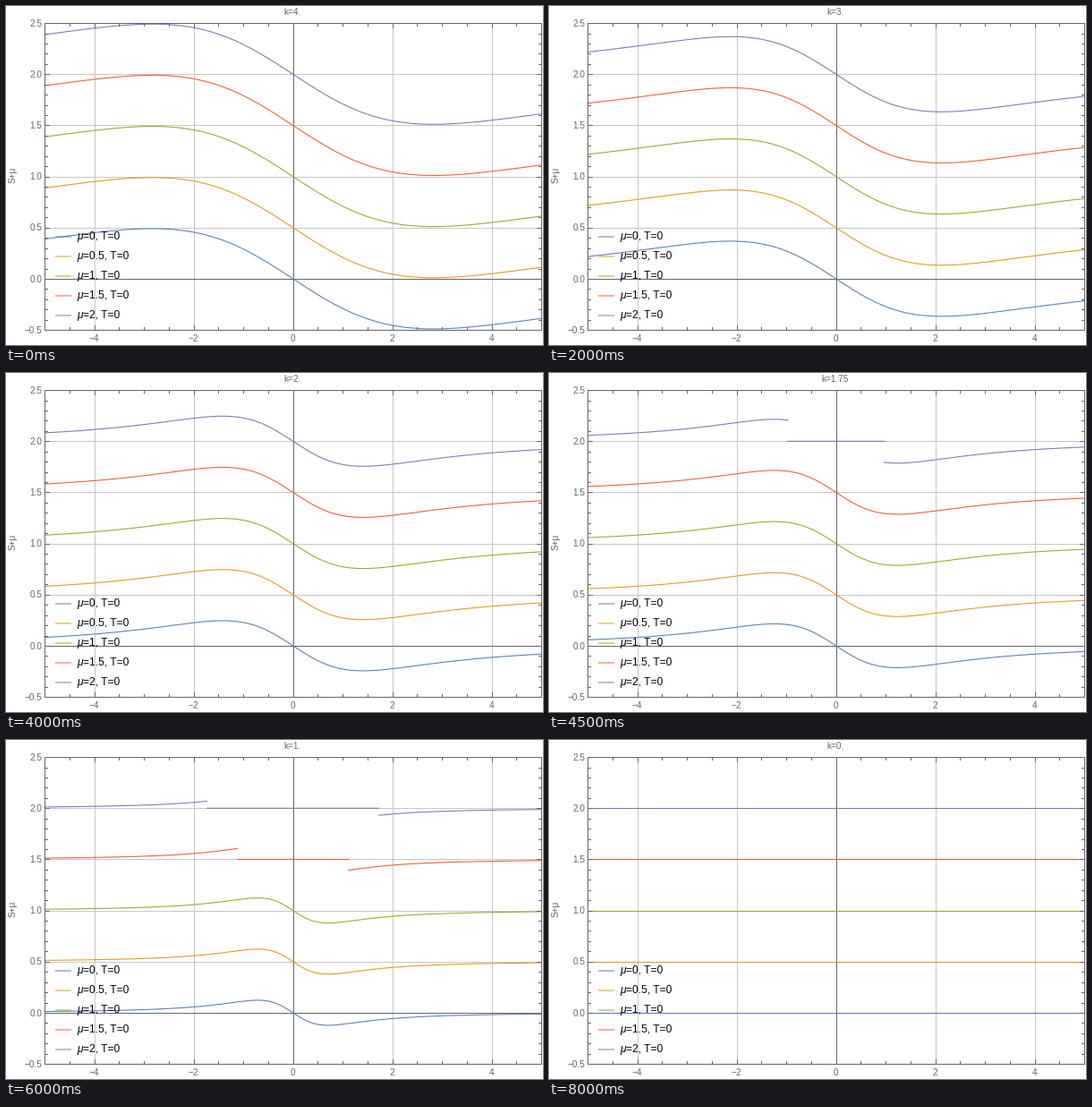
A matplotlib script that plays this animation: 600 by 379 pixels, repeating every 8.5 s.

```python
import numpy as np
import matplotlib.pyplot as plt
from matplotlib.animation import FuncAnimation

W, H, DPI = 600, 379, 100
PX = 72 / DPI  # points per pixel
LEFT, RIGHT, TOP, BOTTOM = 43.1, 598.1, 19.1, 362.1
FRAME, GRID = "#666666", "#c7c7c7"
MUS = [0, 0.5, 1, 1.5, 2]
COLORS = [
    (0.368, 0.507, 0.710),
    (0.881, 0.611, 0.142),
    (0.560, 0.692, 0.195),
    (0.923, 0.386, 0.209),
    (0.528, 0.471, 0.701),
]

plt.rcParams["font.family"] = "Liberation Sans"
fig = plt.figure(figsize=(W / DPI, H / DPI), dpi=DPI, facecolor="white")
ax = fig.add_axes([0, 0, 1, 1])
ax.set_xlim(0, W)
ax.set_ylim(H, 0)
ax.axis("off")


def to_x(x):
    return LEFT + (x + 5) * (RIGHT - LEFT) / 10


def to_y(y):
    return BOTTOM - (y + 0.5) * (BOTTOM - TOP) / 3


def line(xs, ys, color, width=1.0, z=1, **kw):
    return ax.plot(xs, ys, color=color, lw=width * PX, zorder=z, **kw)[0]


def label(x, y, text, size=10, color=FRAME, **kw):
    return ax.text(x, y, text, size=size * PX, color=color,
                   va="baseline", zorder=6, **kw)


def number(v, fmt):
    return format(v, fmt).replace("-", "\u2212")


def draw_frame():
    for x in range(-4, 5, 2):
        gx = to_x(x)
        line([gx, gx], [TOP, BOTTOM], FRAME if x == 0 else GRID, z=2 if x == 0 else 1)
        label(gx - 0.3, 375, number(x, "d"), ha="center")
    for y in np.arange(0, 2.1, 0.5):
        gy = to_y(y)
        line([LEFT, RIGHT], [gy, gy], FRAME if y == 0 else GRID, z=2 if y == 0 else 1)
    for y in np.arange(-0.5, 2.6, 0.5):
        label(40.3, to_y(y) + 3.7, number(y, ".1f"), ha="right")

    # minor ticks every 0.5 across and every 0.1 up
    for i in range(-10, 11):
        x, size = to_x(i / 2), 5 if i % 4 == 0 else 3
        line([x, x], [BOTTOM, BOTTOM - size], FRAME, z=4)
        line([x, x], [TOP, TOP + size], FRAME, z=4)
    for i in range(-5, 26):
        y, size = to_y(i / 10), 5 if i % 5 == 0 else 3
        line([LEFT, LEFT + size], [y, y], FRAME, z=4)
        line([RIGHT, RIGHT - size], [y, y], FRAME, z=4)
    line([LEFT, RIGHT, RIGHT, LEFT, LEFT],
         [TOP, TOP, BOTTOM, BOTTOM, TOP], FRAME, z=4)

    ax.text(12.5, 189, "S+\u03bc", size=10 * PX, color=FRAME, rotation=90,
            ha="right", va="center", zorder=6)


def draw_legend():
    for i, (mu, color) in enumerate(zip(MUS, COLORS)):
        y = 258 + 22 * i
        line([55, 73], [y, y], color, z=5, snap=False, solid_capstyle="butt")
        label(79, y + 3, "\u03bc", 12, "black", style="italic")
        label(86, y + 3, f"={mu:g}, T=0", 12, "black")


def curve(k, mu):
    """Return S + mu along x, flat where the gap is below mu."""
    edge = np.sqrt(max(mu**2 - k**2, 0))
    if k == 0:
        return np.array([-5, 5]), np.array([mu, mu])

    def s(x):
        return -k**3 * x / (np.pi * (x**2 + k**2) ** 1.5)

    if edge == 0:
        x = np.linspace(-5, 5, 400)
        return x, s(x) + mu
    outer = np.linspace(edge, 5, 200)
    tail = s(outer)
    x = np.concatenate([-outer[::-1], [np.nan, -edge, edge, np.nan], outer])
    y = np.concatenate([-tail[::-1], [np.nan, 0, 0, np.nan], tail])
    return x, y + mu


draw_frame()
draw_legend()
title = label(320, 10, "", ha="center")
curves = [line([], [], c, 1.1, z=3) for c in COLORS]


def update(i):
    k = 4 - i / 4
    title.set_text(f"k={k:g}" + ("." if k == int(k) else ""))
    for ln, mu in zip(curves, MUS):
        x, y = curve(k, mu)
        ln.set_data(to_x(x), to_y(y))
    return [title, *curves]


anim = FuncAnimation(fig, update, frames=17, interval=500, repeat=True,
                     repeat_delay=0, blit=False)
plt.show()
```
